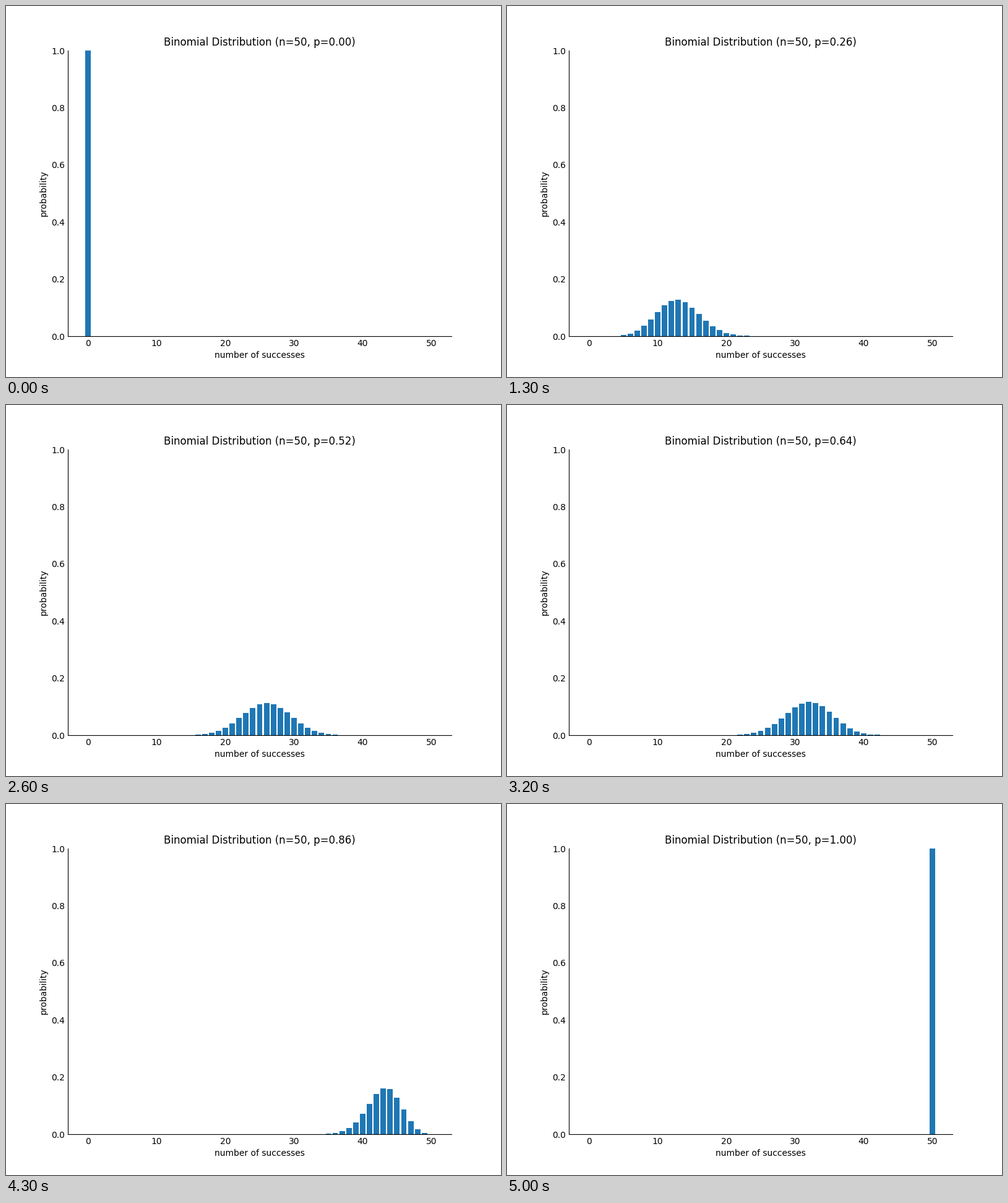
These frames come from a looping animation (800 by 600 pixels, 5100 ms). A matplotlib script:

```python
import math

import matplotlib.pyplot as plt
import numpy as np
from matplotlib.animation import FuncAnimation

N = 50
FRAMES = 51
INTERVAL = 100

plt.rcParams["font.family"] = "DejaVu Sans"

successes = np.arange(N + 1)
ways = np.array([math.comb(N, k) for k in range(N + 1)], dtype=float)


def binomial(p):
    return ways * p**successes * (1 - p) ** (N - successes)


fig, ax = plt.subplots(figsize=(8, 6), dpi=100)
bars = ax.bar(successes, binomial(0.0), width=0.8, color="#1f77b4")
ax.set_ylim(0, 1)
ax.set_xlabel("number of successes")
ax.set_ylabel("probability")
ax.spines[["top", "right"]].set_visible(False)
ax.tick_params(length=0)
title = ax.set_title("")


def update(frame):
    p = frame / (FRAMES - 1)
    for bar, height in zip(bars, binomial(p)):
        bar.set_height(height)
    title.set_text(f"Binomial Distribution (n={N}, p={p:.2f})")
    return [*bars, title]


anim = FuncAnimation(fig, update, frames=FRAMES, interval=INTERVAL,
                     init_func=lambda: update(0), repeat=True, repeat_delay=0)
plt.show()
```
